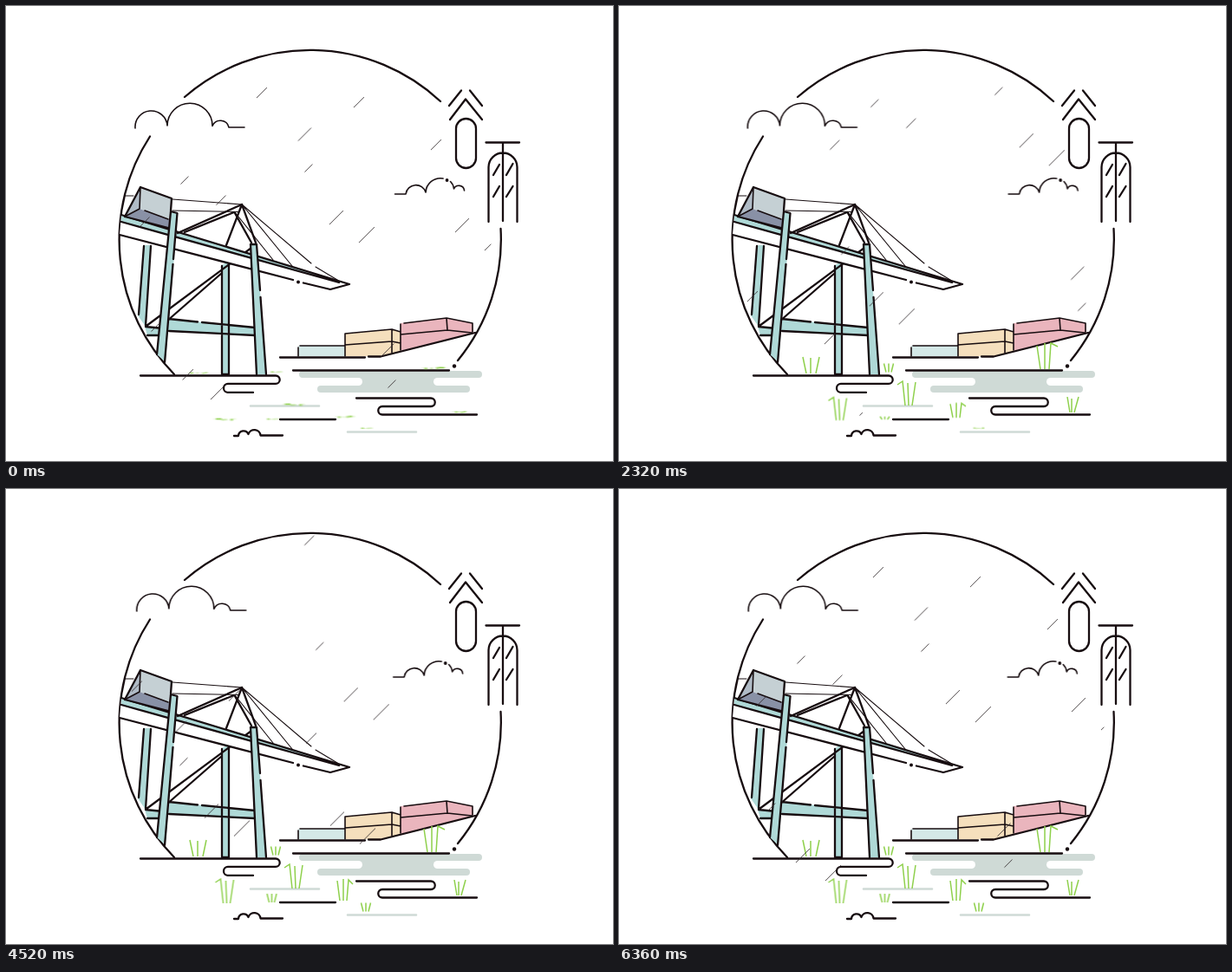
Recreate the animation shown at these times as an HTML page. Size 700 px wide and 525 px high, loop 6.4 s.

```html
<!DOCTYPE html>
<html lang="en">
<head>
<meta charset="utf-8">
<title>Harbour in the rain</title>
<style>
html, body { margin: 0; width: 100%; height: 100%; overflow: hidden; background: #fff; }
svg { display: block; width: 700px; height: 525px; }
.ink { fill: none; stroke: #170d10; stroke-width: 2.3; stroke-linecap: round; stroke-linejoin: round; }
.thin { stroke-width: 1.6; }
.hair { stroke-width: 1.1; }
.dot { fill: #170d10; stroke: none; }
.teal { fill: #afd9d7; }
.water { fill: #cfdad6; }
.ripple { stroke: #cfdad6; stroke-width: 2.6; stroke-linecap: round; }
.grass { fill: none; stroke: #8ed04b; stroke-width: 1.5; }
.grass path { vector-effect: non-scaling-stroke; }
.rain { stroke: #3a3436; stroke-width: .9; }
.cloud { animation: sway .8s cubic-bezier(.37, 0, .63, 1) -.4s infinite alternate; }
.cloud.far { animation-name: swayBack; }
.arrive { animation: arrive 3.2s linear infinite; }
.leave { animation: leave 3.2s linear infinite; }
@keyframes sway { from { transform: translateX(2px); } to { transform: translateX(-2px); } }
@keyframes swayBack { from { transform: translateX(-2px); } to { transform: translateX(2px); } }
@keyframes arrive { from { transform: translate(323px, -323px); } to { transform: none; } }
@keyframes leave { from { transform: none; } to { transform: translate(-349px, 309px); } }
</style>
</head>
<body>
<svg viewBox="0 0 700 525">
  <defs>
    <clipPath id="sky"><circle cx="343.5" cy="267" r="216"/></clipPath>
  </defs>

  <!-- water -->
  <g class="water">
    <rect x="338" y="421" width="211" height="8" rx="4"/>
    <rect x="359" y="438" width="176" height="8" rx="4"/>
    <rect x="404" y="427" width="96" height="13"/>
  </g>
  <rect x="380" y="429" width="31" height="9" rx="4.5" fill="#fff"/>
  <rect x="493" y="429" width="40" height="9" rx="4.5" fill="#fff"/>
  <path class="ripple" d="M282 461.5H361M394 491.5H473"/>

  <!-- frame -->
  <path class="ink" d="M206 105A220.5 220.5 0 0 1 501 110M166 150.500A220.500 220.500 0 0 0 194 425M570.500 257A220.500 220.500 0 0 1 521 409"/>

  <!-- crane -->
  <g class="teal">
    <path d="M159 276L167 276L161 370L152 357Z"/>
    <path d="M249 299L257 295V425H249Z"/>
    <path d="M160 370L177 371V381L163 380ZM187 361L288 371V380L187 375Z"/>
  </g>
  <path class="ink" d="M159 277L153 356M167 277L161 369M249 300V425H257V297M161 370L176 371.500M163 380H175M188 361L221 364.500M226 365L287 371M188 375L287 380M162 369L283 279M177 371L249 308"/>
  <g class="ink hair">
    <path d="M137 219H147M192 223L272 229M192 236L268 237.500M272 229L352 297M357 301L382 317M272 229L330 301M272 229L308 294M134 235L140 236M272 229L396 321" style="display:none"/>
    <path d="M137 219H147M192 223L272 229M192 236L268 237.500M272 229L352 297M357 301L382 316M272 229L330 300M264 238L308 293"/>
  </g>
  <path d="M133 241L396 321L374 327L131 264Z" fill="#fff"/>
  <path class="teal" d="M133 241L396 321L372 316L133 249Z"/>
  <path class="ink" d="M133 241L396 321L374 327L343 319.500M331 316L131 264M133 249L384 319"/>
  <circle class="dot" cx="337" cy="318.500" r="2"/>
  <path class="ink" d="M198 262L272 229L254 276M206 261L263 238M272 229L288 273M264 239L283 273"/>
  <g stroke="none">
    <path fill="#c5d0d4" d="M155 209L192 222L190 248L154 234Z"/>
    <path fill="#b0bbc6" d="M155 209L154 234L137 243Z"/>
    <path fill="#8991a6" d="M137 243L154 234L190 247L188 256Z"/>
    <path class="teal" d="M190 237L198 239L184 411L174 402Z"/>
    <path class="teal" d="M282 275H289L300 425H289Z"/>
  </g>
  <path class="ink thin" d="M155 209L154 234L137 243M160 236L187 246"/>
  <path class="ink" d="M137 243L155 209L191 222L190 236M137 243L187 256M174 402L190 237L198 239L185.500 290M185 297L179 409" style="display:none"/>
  <path class="ink" d="M137 243L155 209L191 222L190 236M137 243L187 256M174 402L190 237L197.500 239L186 292M185 298L181 405" style="display:none"/>
  <path class="ink" d="M137 243L155 209L191 222L190 236M137 243L187 256M174 402L190 237L197.500 239L193 292M192.500 298L183 411M289 425L282 275H289L293 328M293.500 336L300 425"/>

  <!-- ground and river lines -->
  <path class="ink" d="M155 426.500H311a4.700 4.700 0 0 1 0 9.400H256a5 5 0 0 0 0 10H285M331 420.500H511M404 452.500H490a4.700 4.700 0 0 1 0 9.500H434a4.700 4.700 0 0 0 0 9.500H543M316 477H380M263 496H268a6 6 0 0 1 11.500 -2a7.200 7.200 0 0 1 14 1.500H319"/>
  <circle class="dot" cx="517" cy="415.500" r="2.200"/>

  <!-- ship -->
  <path fill="#d4e8e7" d="M337 392H391V404H337Z"/>
  <path fill="#f5dfbd" d="M391 378L445 373L455 376V398L432 404H391Z"/>
  <path fill="#eab5bd" d="M455 366L508 360L538 366L539 377L455 398Z"/>
  <path class="ink" d="M316 405.500H414M418 404.500H432L541 377"/>
  <path class="ink thin" d="M337 404V394M339 392H390M391 404V378L445 373L455 376M445 373V400M391 391L445 387L455 389M455 397V367M459 366L508 360L538 366V376M508 360L509 374M455 379L509 374L537 377"/>

  <!-- towers -->
  <g class="ink">
    <path d="M512 131L530 107.500L549 131M511 115L525 97.500M535 97.500L549 115"/>
    <rect x="519" y="130" width="23" height="57" rx="11.500"/>
    <path d="M553.500 157.500H592M573 158V248M556.500 249V186a16.500 16.500 0 0 1 33 0V249M562 195L569 183M577 195L584.500 182M562 220L569 208M577 220L584.500 208"/>
  </g>

  <!-- clouds -->
  <g class="cloud">
    <path class="ink thin" d="M149 141A18.500 18.500 0 0 1 186 138A26 26 0 0 1 238 138.500A10 10 0 0 1 257 140H275"/>
  </g>
  <g class="cloud far">
    <path class="ink thin" d="M448.500 217H461A11.800 11.800 0 0 1 484 215A17 17 0 0 1 504 199M512.500 202.500Q516 206 516.500 211A6.300 6.300 0 0 1 528.500 213"/>
    <circle class="dot" cx="508.500" cy="201" r="1.900"/>
  </g>

  <g class="grass" id="grass"></g>

  <g class="rain" clip-path="url(#sky)">
    <path class="arrive"/>
    <path class="leave"/>
  </g>
</svg>
<script>
const NS = 'http://www.w3.org/2000/svg';
const LOOP = 6400, GROW = 600, FLAT = 'scaleY(.06)', FULL = 'scaleY(1)';

// Drops: centre x, centre y, half extent
const drops = [
  [295, 100, 6], [407, 111, 6], [344.5, 148, 7.5], [496, 160, 6], [349, 187, 4.5],
  [206, 201, 4.5], [248, 224, 5.5], [381, 244, 8], [416, 264, 9], [526, 253, 8],
  [561, 273, 9], [160, 249, 5.5], [208, 427, 8], [243, 447, 9], [172, 371, 4.5],
  [445, 436, 4.5], [440, 397, 7.5]
];
const rain = drops.map(([x, y, r]) => `M${x - r} ${y + r}l${2 * r} ${-2 * r}`).join('');
document.querySelectorAll('.rain path').forEach(p => p.setAttribute('d', rain));

const bentLeft = 'M-3 0L-6 -28L-12 -24M1 0L0 -26M5 0L9 -27';
const bentRight = 'M-5 0L-9 -27M0 0V-30M5 0L7 -30L15 -26';
const shortRight = 'M-5 0L-8 -23M-1 0V-25M3 0L5 -24L10 -19';
const wide = 'M-5 0L-9 -19M0 0V-18M6 0L10 -19';
const slim = 'M-2 0L-5 -18M0 0V-16M3 0L8 -18';
const small = 'M-3 0L-5.500 -10M0 0V-10M3 0L5.500 -10';

// Tufts: base x, base y, shape, start of growth in ms
const tufts = [
  [333, 461, bentLeft, 80], [491, 419, bentRight, 420], [311, 422.5, small, 760],
  [522, 469, slim, 960], [221, 424, wide, 1680], [253.5, 478, bentLeft, 1820],
  [390, 475, shortRight, 1960], [306.5, 477, small, 2100], [415, 487.5, small, 2260]
];
for (const [x, y, d, start] of tufts) {
  const tuft = document.createElementNS(NS, 'g');
  const blades = document.createElementNS(NS, 'path');
  tuft.setAttribute('transform', `translate(${x} ${y})`);
  blades.setAttribute('d', d);
  tuft.append(blades);
  document.getElementById('grass').append(tuft);
  blades.animate([
    { transform: FLAT },
    { transform: FLAT, offset: start / LOOP, easing: 'ease-in-out' },
    { transform: FULL, offset: (start + GROW) / LOOP },
    { transform: FULL }
  ], { duration: LOOP, iterations: Infinity });
}
</script>
</body>
</html>
```
